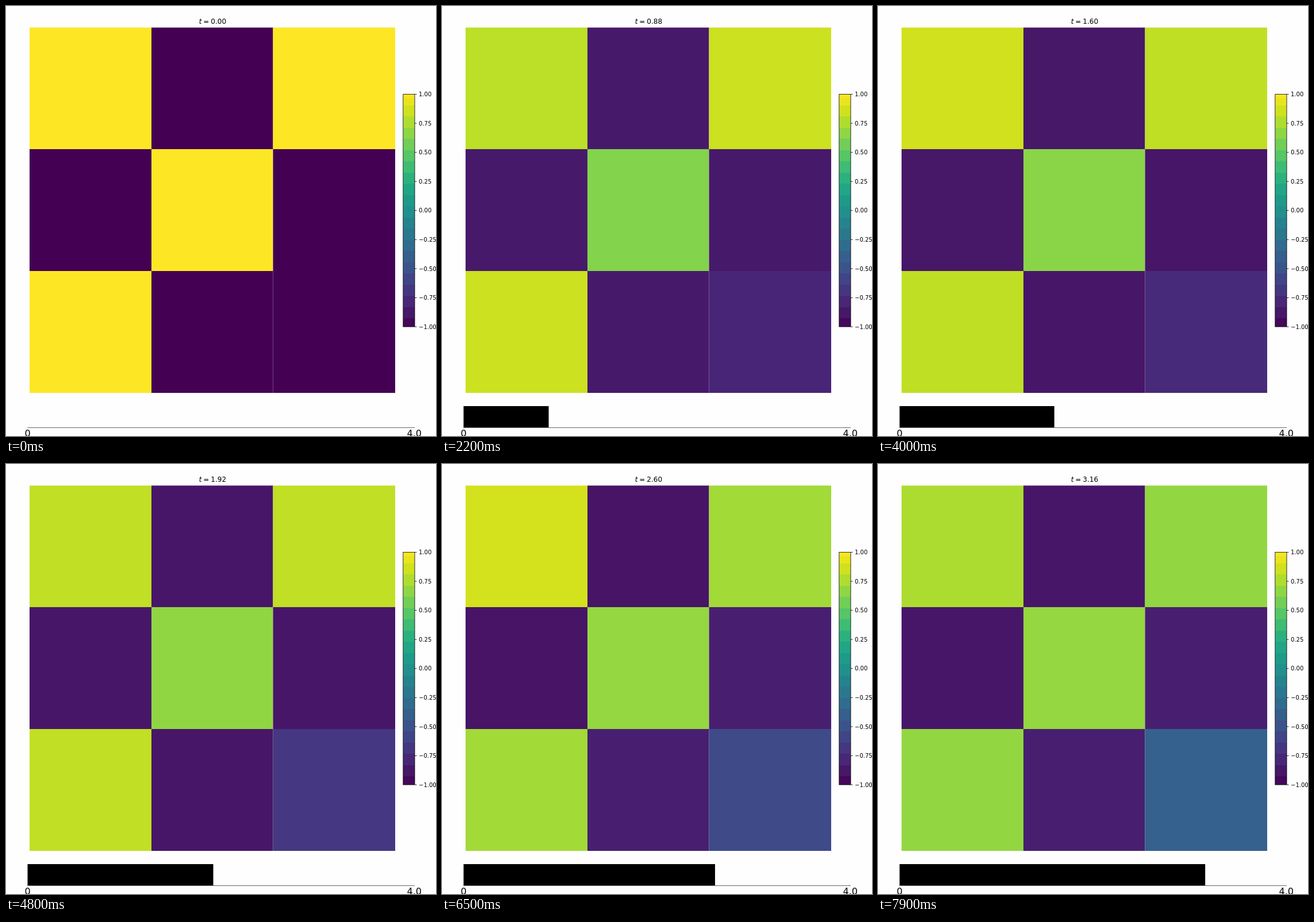
These frames come from a looping animation (748x748 px, 8000 ms). An HTML page with a canvas:

```html
<!DOCTYPE html>
<html lang="en">
<head>
<meta charset="utf-8">
<title>Checkerboard decay</title>
<style>
  html, body { margin: 0; width: 100%; height: 100%; overflow: hidden; background: #fefefe; }
  canvas { display: block; }
</style>
</head>
<body>
<canvas id="stage" width="748" height="748"></canvas>
<script>
const ctx = document.getElementById('stage').getContext('2d');
const FONT = '"DejaVu Sans", Verdana, sans-serif';
const STEP_MS = 100, STEPS = 80;

// Viridis, sampled every 0.05
const viridis = ('440154 471365 482475 463480 414487 3b528b 355f8d 2f6c8e 2a788e 25848e 21918c ' +
  '1e9c89 22a884 2fb47c 44bf70 5ec962 7ad151 9bd93c bddf26 dfe318 fde725')
  .split(' ').map(h => [0, 2, 4].map(i => parseInt(h.substr(i, 2), 16)));

function color(v) {
  const p = Math.min(1, Math.max(0, v)) * 20, i = Math.min(19, Math.floor(p));
  const rgb = viridis[i].map((c, k) => Math.round(c + (viridis[i + 1][k] - c) * (p - i)));
  return `rgb(${rgb})`;
}

// Cell values at the key steps; the grid is symmetric about its diagonal
const keys = [0, 8, 22, 32, 48, 65, 79];
const curves = {
  a: [1, .877, .898, .95, .906, .932, .877],
  b: [0, .053, .069, .063, .059, .053, .058],
  c: [1, .932, .922, .898, .906, .86, .837],
  d: [1, .838, .813, .813, .833, .839, .84],
  e: [0, .053, .069, .063, .059, .085, .085],
  f: [0, .113, .103, .085, .158, .22, .308]
};
const grid = ['abc', 'bde', 'cef'];
const xs = [41, 253, 464.5, 677], ys = [37.5, 249, 461, 673];

// Cubic through the key points, starting and ending flat
function valueAt(curve, step) {
  let i = 0;
  while (i < keys.length - 2 && step >= keys[i + 1]) i++;
  const slope = k => k === 0 || k === keys.length - 1 ? 0 :
    (curve[k + 1] - curve[k - 1]) / (keys[k + 1] - keys[k - 1]);
  const h = keys[i + 1] - keys[i], u = (step - keys[i]) / h, w = 1 - u;
  return w * w * (1 + 2 * u) * curve[i] + u * u * (3 - 2 * u) * curve[i + 1] +
    h * u * w * (w * slope(i) - u * slope(i + 1));
}

function rect(x, y, w, h, fill) {
  ctx.fillStyle = fill;
  ctx.fillRect(x, y, w, h);
}

function text(s, x, y, size, align = 'left', style = '') {
  ctx.font = `${style} ${size}px ${FONT}`;
  ctx.textAlign = align;
  ctx.fillStyle = '#000';
  ctx.fillText(s, x, y);
}

function drawColorbar() {
  const top = 153.5, height = 404.5;
  const edges = [top, 160];
  for (let i = 0; i < 20; i++) edges.push(Math.round(172.5 + 19.5 * i));
  edges.push(top + height);
  for (let i = 0; i < edges.length - 1; i++) {
    const y = edges[i], h = edges[i + 1] - y;
    rect(691, y, 20, h, color(1 - (y + h / 2 - top) / height));
  }
  ctx.strokeStyle = '#000';
  ctx.lineWidth = 0.8;
  ctx.strokeRect(690.8, top, 20.2, height);
  for (let i = 0; i <= 8; i++) {
    const v = 1 - i / 4, y = top + height * i / 8;
    rect(711, y - 0.4, 3.5, 0.8, '#000');
    text((v < 0 ? '\u2212' : '') + Math.abs(v).toFixed(2), 718, y + 3.7, 10);
  }
}

function draw(step) {
  rect(0, 0, 748, 748, '#fefefe');
  grid.forEach((row, r) => [...row].forEach((name, c) =>
    rect(xs[c], ys[r], xs[c + 1] - xs[c], ys[r + 1] - ys[r], color(valueAt(curves[name], step)))));
  drawColorbar();

  const t = step * 0.04;
  text('t', 335.7, 31, 12, 'left', 'italic');
  text('=', 343.2, 31, 12);
  text(t.toFixed(2), 356.3, 31, 12);

  rect(37.5, 696, 673 * t / 4, 37.5, '#000');
  rect(37.5, 733, 673.5, 1, '#666');
  text('0', 37.7, 749, 16, 'center');
  text('4.0', 710.3, 749, 16, 'center');
}

const start = performance.now();
function tick() {
  draw(Math.floor((performance.now() - start) / STEP_MS) % STEPS);
  requestAnimationFrame(tick);
}
tick();
</script>
</body>
</html>
```
